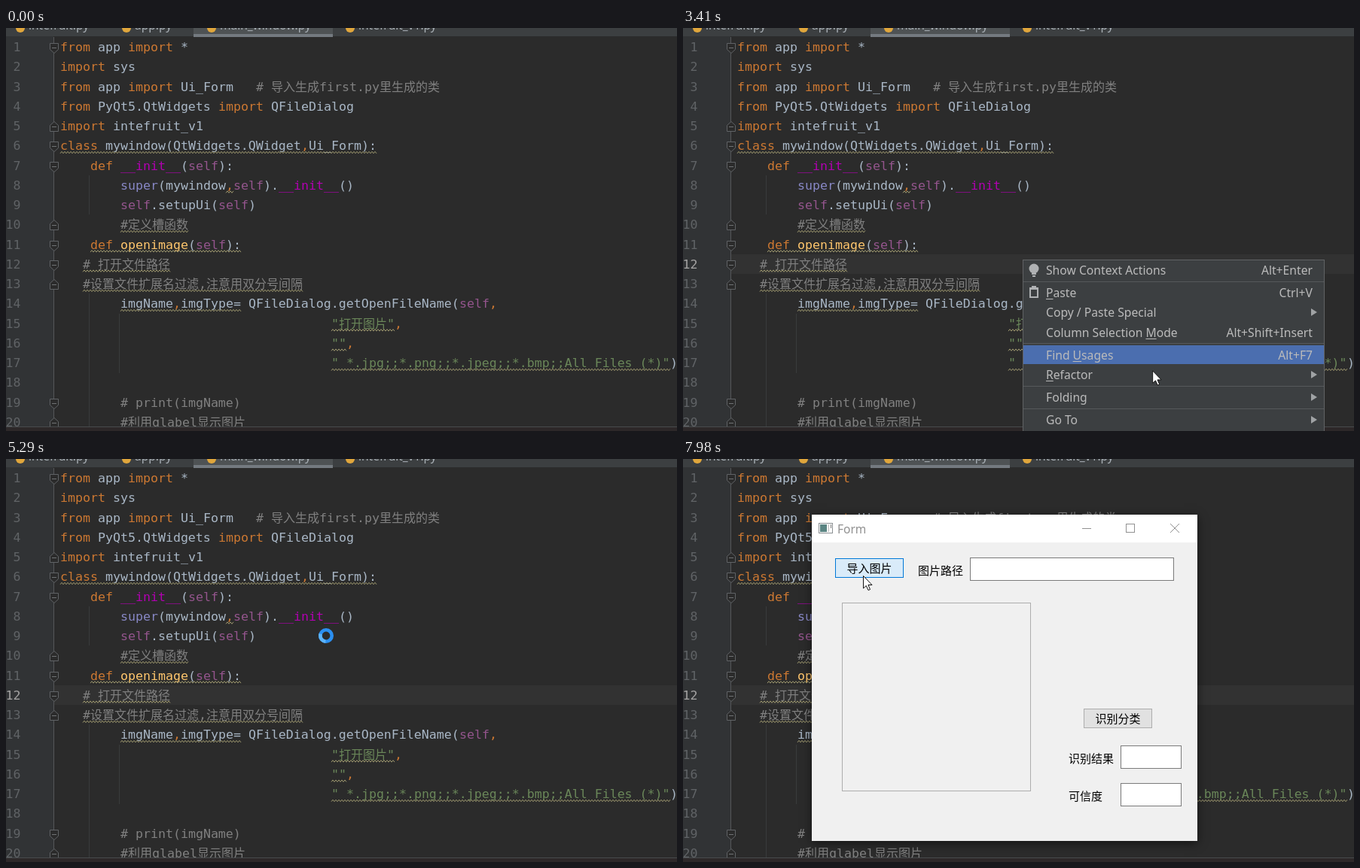
An HTML page with a canvas that plays this animation: 891 by 536 pixels, repeating every 8 s.

```html
<!DOCTYPE html>
<html lang="zh-CN">
<head>
<meta charset="utf-8">
<title>Editor and form</title>
<style>
html, body { margin: 0; width: 100%; height: 100%; overflow: hidden; background: #2b2b2b; }
canvas { display: block; }
</style>
</head>
<body>
<canvas id="stage" width="891" height="536"></canvas>
<script>
const g = document.getElementById('stage').getContext('2d');
const LOOP = 8000, CELL = 10, HAN = 16, ROW = 26.26;
const MONO = '16.6px "DejaVu Sans Mono", monospace';
const CJK = '"Noto Sans CJK SC", "Noto Sans CJK", "Noto Sans CJK JP", sans-serif';
const UI = '"Noto Sans", "Open Sans", sans-serif';

// k keyword, t text, c comment, s self, m magic, b builtin, q string, f function
const INK = { k: '#cc7832', t: '#a9b7c6', c: '#808080', s: '#94558d',
  m: '#b200b2', b: '#8888c6', q: '#6a8759', f: '#ffc66d' };

// x, coloured segments, then the underlined range
const CODE = [
  [72, 'kfrom|t app |kimport|t *'],
  [72, 'kimport|t sys'],
  [72, 'kfrom|t app |kimport|t Ui_Form   |c# 导入生成first.py里生成的类'],
  [72, 'kfrom|t PyQt5.QtWidgets |kimport|t QFileDialog'],
  [72, 'kimport|t intefruit_v1'],
  [72, 'kclass|t mywindow(QtWidgets.QWidget|k,|tUi_Form):', 72, 492],
  [112, 'kdef |m__init__|t(|sself|t):'],
  [152, 'bsuper|t(mywindow|k,|sself|t).|m__init__|t()', 292, 302],
  [152, 'sself|t.setupUi(|sself|t)'],
  [152, 'c#定义槽函数', 152, 242],
  [112, 'kdef |fopenimage|t(|sself|t):', 112, 312],
  [102, 'c# 打开文件路径', 102, 218],
  [102, 'c#设置文件扩展名过滤,注意用双分号间隔', 102, 394],
  [152, 'timgName|k,|timgType= QFileDialog.getOpenFileName(|sself|k,', 152, 312],
  [432, 'q"打开图片"|k,', 432, 516],
  [432, 'q""|k,', 432, 452],
  [432, 'q" *.jpg;;*.png;;*.jpeg;;*.bmp;;All Files (*)"|t)', 432, 882],
  [72, ''],
  [152, 'c# print(imgName)'],
  [152, 'c#利用qlabel显示图片']
];
const FOLDS = { 1: 1, 5: -1, 6: 1, 7: 1, 10: -1, 11: 1, 12: 1, 13: -1, 19: 1, 20: -1 };

// centre y, label, underlined letter index, shortcut ('>' opens a submenu)
const MENU = [
  [322, 'Show Context Actions', -1, 'Alt+Enter'],
  [352, 'Paste', 0, 'Ctrl+V'],
  [378, 'Copy / Paste Special', -1, '>'],
  [405, 'Column Selection Mode', 17, 'Alt+Shift+Insert'],
  [435, 'Find Usages', 5, 'Alt+F7'],
  [461, 'Refactor', 0, '>'],
  [491, 'Folding', -1, '>'],
  [521, 'Go To', -1, '>']
];

// pointer shape, start, end, points passed at even time steps
const MOVES = [
  ['none', 0, 1, [[0, 0]]],
  ['beam', 590, 1350, [[677, 524], [520, 390], [365, 285], [337, 266], [400, 280], [457, 301]]],
  ['beam', 2670, 2730, [[457, 301], [453, 309]]],
  ['arrow', 2890, 2990, [[453, 309]]],
  ['arrow', 2990, 3410, [[453, 309], [520, 362], [623, 455]]],
  ['arrow', 3410, 3540, [[623, 455], [664, 560]]],
  ['none', 3540, 3541, [[664, 560]]],
  ['beam', 4160, 4590, [[565, 503], [360, 400], [228, 300], [300, 255], [425, 247]]],
  ['spin', 5060, 5300, [[425, 235]]],
  ['spin', 5300, 5500, [[425, 235], [441, 204]]],
  ['arrow', 5540, 6280, [[441, 204]]],
  ['arrow', 6280, 6580, [[441, 204], [430, 160], [418, 106], [416, 95]]],
  ['arrow', 6630, 6700, [[416, 95], [416, 93]]],
  ['arrow', 6760, 7010, [[416, 93], [340, 125], [239, 155]]]
];
const PRESSES = [[2890, 2990], [6210, 6720], [7310, 7430]];

const clamp = v => Math.max(0, Math.min(1, v));
const phase = (t, a, b) => clamp((t - a) / (b - a));
const within = (t, a, b) => t >= a && t < b;
const mix = (a, b, p) => `rgb(${a.map((v, i) => Math.round(v + (b[i] - v) * p))})`;

function spline(points, p) {
  const last = points.length - 1, s = p * last, i = Math.min(Math.floor(s), Math.max(0, last - 1)), u = s - i;
  const at = n => points[Math.max(0, Math.min(last, n))];
  const [a, b, c, d] = [at(i - 1), at(i), at(i + 1), at(i + 2)];
  return [0, 1].map(k => b[k] + u / 2 * (c[k] - a[k] +
    u * (2 * a[k] - 5 * b[k] + 4 * c[k] - d[k] + u * (3 * (b[k] - c[k]) + d[k] - a[k]))));
}

function pointer(t) {
  const [shape, a, b, points] = MOVES.findLast(m => t >= m[1]);
  const [x, y] = spline(points, phase(t, a, b));
  return { shape, x, y };
}

function rect(x, y, w, h, fill, stroke) {
  g.fillStyle = fill;
  g.fillRect(x, y, w, h);
  if (stroke) {
    g.strokeStyle = stroke;
    g.lineWidth = 1;
    g.strokeRect(x + .5, y + .5, w - 1, h - 1);
  }
}

function text(s, x, y, font, color, align = 'left') {
  g.font = font;
  g.fillStyle = color;
  g.textAlign = align;
  g.fillText(s, x, y);
}

function shape(points, fill, stroke, close = true) {
  g.beginPath();
  points.forEach(([x, y]) => g.lineTo(x, y));
  if (close) g.closePath();
  if (fill) { g.fillStyle = fill; g.fill(); }
  if (stroke) { g.strokeStyle = stroke; g.lineWidth = 1; g.stroke(); }
}

function disc(x, y, r, fill) {
  g.beginPath();
  g.arc(x, y, r, 0, 7);
  g.fillStyle = fill;
  g.fill();
}

function codeLine(x, y, line) {
  for (const part of line.split('|')) {
    for (const run of part.slice(1).match(/[\u4e00-\u9fff]+|[^\u4e00-\u9fff]+/g) || []) {
      const han = run.charCodeAt(0) > 0x4dff;
      text(run, x, y, han ? HAN + 'px ' + CJK : MONO, INK[part[0]]);
      x += run.length * (han ? HAN : CELL);
    }
  }
}

function wave(x0, x1, y) {
  const points = [];
  for (let x = x0, i = 0; x <= x1; x += 2, i++) points.push([x, y + (i % 2 ? 1 : 3.5)]);
  shape(points, null, '#a09a70', false);
}

function tabs() {
  rect(0, 0, 891, 11, '#3c3f41');
  rect(249, 0, 185, 8, '#4e5254');
  rect(249, 8, 185, 4, '#747a80');
  [[9, 'intefruit.py'], [150, 'app.py'], [263, 'main_window.py'], [447, 'intefruit_v1.py']].forEach(([x, name]) => {
    disc(x + 10, 0, 6, '#e0a63c');
    text(name, x + 21, 2, '15.5px ' + UI, '#a9b0b6');
  });
}

function editor(t) {
  const caret = t >= 2890;
  rect(0, 0, 891, 536, '#2b2b2b');
  rect(0, 11, 63, 520, '#313335');
  if (caret) rect(64, 301, 827, 26, '#323232');
  rect(63, 12, 1, 519, '#555759');
  [[110, 196, 52], [110, 353, 177], [150, 380, 79]].forEach(([x, y, h]) => rect(x, y, 1, h, '#393b3c'));
  g.save();
  g.beginPath();
  g.rect(0, 12, 891, 518);
  g.clip();
  CODE.forEach(([x, line, from, to], i) => {
    const n = i + 1, y = 31 + ROW * i;
    text(n, 19.5, y, MONO, caret && n === 12 ? '#a4a3a3' : '#606366', 'right');
    codeLine(x, y, line);
    if (from) wave(from, to, y + 1);
    const dir = FOLDS[n];
    if (dir) {
      const c = Math.round(y - 5) + .5;
      const side = v => c + dir * v;
      shape([[58.5, side(-6)], [69.5, side(-6)], [69.5, side(2)], [64, side(7)], [58.5, side(2)]], '#2b2b2b', '#606366');
      rect(61, c - .5, 6, 1, '#707375');
    }
  });
  g.restore();
  rect(0, 530, 891, 1, '#484b4d');
  rect(0, 531, 891, 5, '#2d2829');
  tabs();
}

function menu(hoverY) {
  const font = '15.7px ' + UI, ink = '#bbbbbb';
  rect(451, 308, 401, 240, '#3c3f41', '#616365');
  [337, 419, 476, 506].forEach(y => rect(452, y, 399, 1, '#56595b'));
  MENU.forEach(([y, label, letter, key]) => {
    if (Math.abs(hoverY - y) < 13.2) rect(452, y - 13, 399, 25, '#4b6eaf');
    text(label, 482, y + 6, font, ink);
    if (letter >= 0) {
      const x = 482 + g.measureText(label.slice(0, letter)).width;
      rect(x, y + 8, g.measureText(label[letter]).width, 1, ink);
    }
    if (key === '>') shape([[834, y - 5], [842, y], [834, y + 5]], '#a0a3a5');
    else text(key, 836, y + 6, font, ink, 'right');
  });
  disc(466, 320, 6.5, '#afb1b3');
  rect(463, 326, 6, 2, '#afb1b3');
  rect(464, 329, 4, 2, '#afb1b3');
  rect(460, 345, 12, 14, '#afb1b3');
  rect(462, 348, 8, 9, '#3c3f41');
  rect(463, 343, 6, 4, '#afb1b3');
}

function formWindow(t, x, y) {
  const open = phase(t, 5540, 5730), idle = phase(t, 7560, 7700);
  const grow = 1 - .1 * (1 - open) ** 2;
  const ink = mix([0, 0, 0], [145, 145, 145], idle);
  const label = (s, dx, cy, align) => text(s, dx, cy + 5.5, '15px ' + CJK, '#000', align);
  const button = (s, dx, dy, fill = '#e1e1e1', edge = '#adadad') => {
    rect(dx, dy, 91, 26, fill, edge);
    label(s, dx + 45.5, dy + 13, 'center');
  };
  g.save();
  g.globalAlpha = open;
  g.translate(x + 256, y + 217);
  g.scale(grow, grow);
  g.translate(-256, -217);
  g.shadowColor = 'rgba(0,0,0,.55)';
  g.shadowBlur = 20 - 8 * idle;
  g.shadowOffsetY = 3;
  rect(0, 0, 512, 434, '#f0f0f0');
  g.shadowColor = 'transparent';
  rect(0, 0, 512, 37, '#fff');

  rect(9, 11, 19, 14, '#fff', '#8a8f92');
  rect(11, 13, 9, 10, '#5b8583');
  rect(22, 13, 1, 10, '#b5b5b5');
  rect(25, 13, 1, 5, '#777');
  text('Form', 34, 24.5, '15.5px ' + UI, ink);
  rect(359, 18, 12, 1, ink);
  g.strokeStyle = ink;
  g.lineWidth = 1;
  g.strokeRect(417.5, 12.5, 11, 11);
  shape([[476, 12], [488, 24]], null, ink, false);
  shape([[488, 12], [476, 24]], null, ink, false);

  if (t >= 5890) {
    const hover = phase(t, 7040, 7120), down = phase(t, 7310, 7350) - .5 * phase(t, 7430, 7600);
    const fill = down > 0 ? mix([229, 241, 251], [204, 228, 247], down) : mix([225, 225, 225], [229, 241, 251], hover);
    button('导入图片', 31, 58, fill, mix([173, 173, 173], [0, 120, 215], hover));
    button('识别分类', 361, 258);
    label('图片路径', 141, 74);
    label('识别结果', 341, 324);
    label('可信度', 341, 374);
    [[210, 57, 271], [410, 307, 81], [410, 357, 81]].forEach(([dx, dy, w]) => rect(dx, dy, w, 31, '#fff', '#7a7a7a'));
    rect(40, 117, 251, 251, '#f0f0f0', t < 6280 ? '#ffaa00' : '#adadad');
  }
  g.restore();
}

function drawPointer(t, { shape: kind, x, y }) {
  if (kind === 'none') return;
  if (PRESSES.some(([a, b]) => within(t, a, b))) disc(x, y, 15, 'rgba(255,255,80,.78)');
  if (kind === 'beam') {
    x = Math.round(x);
    y = Math.round(y);
    rect(x, y - 7, 1, 15, '#e8e8e8');
    [-8, 7].forEach(dy => {
      rect(x - 3, y + dy, 3, 1, '#e8e8e8');
      rect(x + 1, y + dy, 3, 1, '#e8e8e8');
    });
  } else if (kind === 'spin') {
    const a = t / 160;
    g.lineWidth = 4.6;
    [['#2b8ff0', 0, 7], ['#5cb3fb', a, a + 1.8]].forEach(([color, from, to]) => {
      g.beginPath();
      g.arc(x, y, 7.7, from, to);
      g.strokeStyle = color;
      g.stroke();
    });
  } else {
    shape([[0, 0], [0, 16.5], [3.8, 13], [6.5, 19], [9, 18], [6.4, 12], [11.5, 12]]
      .map(([dx, dy]) => [x + .5 + dx, y + .5 + dy]), '#fff', '#111');
  }
}

function draw(t) {
  const p = pointer(t);
  editor(t);
  if (within(t, 2930, 3970)) menu(pointer(t - 40).y);
  if (t >= 5540) {
    const [x, y] = t < 6280 ? [196, 185] : t < 6760 ? [p.x - 245, p.y - 19] : [171, 74];
    formWindow(t, Math.round(x), Math.round(y));
  }
  drawPointer(t, p);
}

const start = performance.now();
function tick() {
  draw((performance.now() - start) % LOOP);
  requestAnimationFrame(tick);
}
tick();
</script>
</body>
</html>
```
